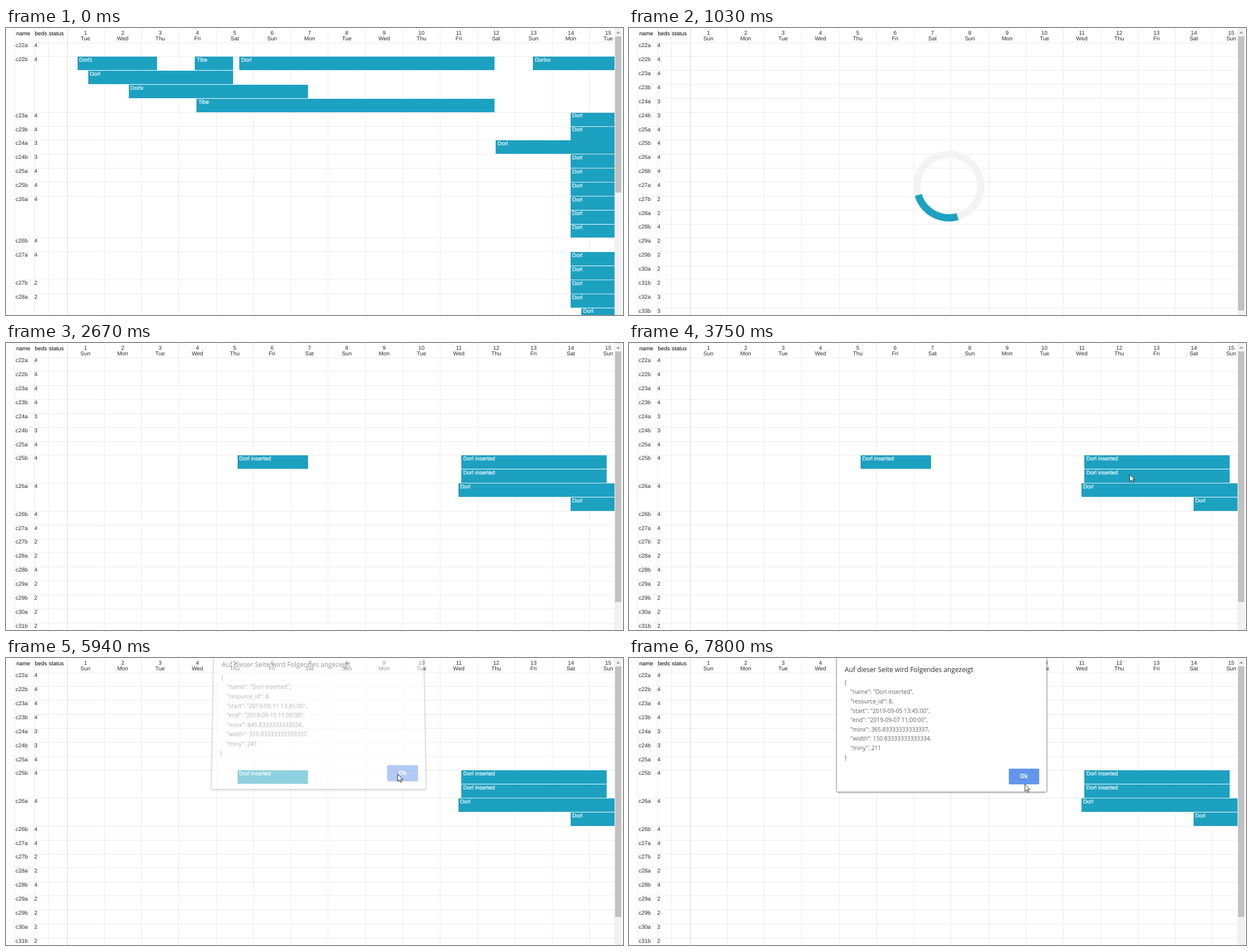
Animation, 1095 px wide and 511 px high, one loop 8 s. Source, as an HTML page:

```html
<!DOCTYPE html>
<html lang="de">
<head>
<meta charset="utf-8">
<title>Belegungsplan</title>
<style>
  html, body { margin: 0; width: 100%; height: 100%; overflow: hidden; background: #fff; }
  #stage { position: relative; width: 1095px; height: 511px; overflow: hidden; }
  #plan { position: absolute; left: 0; top: 0; }
  #plan text {
    font: 9.94px "Liberation Sans", Arial, sans-serif;
    text-rendering: geometricPrecision;
    fill: #2b2b2b;
  }
  #plan .head { fill: #000; }
  #plan .day { text-anchor: middle; }
  #plan .label { fill: #fff; stroke: #fff; stroke-width: .2px; }
  .bar { fill: #1da1c1; }
  .bar, .lines { shape-rendering: crispEdges; }
  .lines { stroke: #ebebeb; fill: none; }

  .scene, .ring, .dialog, .dialog pre, .dialog b { animation: 8s step-end infinite; }
  .scene, .ring { visibility: hidden; }
  .october { animation-name: october; }
  .empty, .ring { animation-name: empty; }
  .loaded { animation-name: loaded; }
  .inserted { animation-name: inserted; }
  @keyframes october { 0% { visibility: visible } 6.25%, 100% { visibility: hidden } }
  @keyframes empty { 0% { visibility: hidden } 6.25% { visibility: visible } 20.875%, 100% { visibility: hidden } }
  @keyframes loaded { 0% { visibility: hidden } 20.875% { visibility: visible } 33.375%, 100% { visibility: hidden } }
  @keyframes inserted { 0% { visibility: hidden } 33.375%, 100% { visibility: visible } }

  .ring { position: absolute; left: 505px; top: 218.5px; }
  .ring i {
    display: block; width: 99.5px; height: 99.5px;
    border: 13.25px solid #f3f3f3; border-top-color: #1da1c1; border-radius: 50%;
    animation: spin 8s linear infinite;
  }
  @keyframes spin {
    0%, 6% { transform: rotate(12.4deg); animation-timing-function: steps(15, end); }
    20.625%, 100% { transform: rotate(433.6deg); }
  }

  .dialog {
    position: absolute; left: 369px; top: -20px; width: 372px; height: 258px;
    box-sizing: border-box; background: #fff; border-radius: 2px; opacity: 0;
    box-shadow: 0 0 0 .8px rgba(0,0,0,.28), 0 1px 4px rgba(0,0,0,.45);
    font-family: "Open Sans", "Noto Sans", sans-serif;
    transform-origin: 186px 40px;
    animation-name: dialog;
  }
  .dialog p, .dialog pre, .dialog b { position: absolute; margin: 0; white-space: pre; }
  .dialog p { left: 13.8px; top: 32.2px; font-size: 11.85px; line-height: 16px; color: #2d2e30; }
  .dialog pre { left: 13.6px; top: 55.8px; font: 10.15px/16.6px "Open Sans", "Noto Sans", sans-serif; color: #606266; }
  .dialog b {
    left: 305px; top: 217px; width: 54px; height: 28px; border-radius: 2.5px;
    background: #669bf7; color: #fff; text-align: center;
    font-size: 9.8px; line-height: 27.5px; animation-name: hover;
  }
  .first { animation-name: first !important; }
  .second { animation-name: second !important; }
  @keyframes first { 0% { visibility: visible } 80%, 100% { visibility: hidden } }
  @keyframes second { 0% { visibility: hidden } 80%, 100% { visibility: visible } }
  @keyframes hover {
    0%, 75.125% { background: #669bf7 }
    66.375%, 97.5%, 100% { background: #6296ec }
  }
  @keyframes dialog {
    0%, 75.125% { opacity: 0; transform: none }
    53%, 87.625% { opacity: .5; transform: perspective(540px) translateY(-8px) rotateX(2.6deg) }
    53.875%, 88.75% { opacity: .85; transform: perspective(540px) translateY(-2.5px) rotateX(.8deg) }
    54.75%, 89.75%, 100% { opacity: 1; transform: none }
    73.25% { opacity: .85; transform: perspective(540px) translateY(-3px) rotateX(1deg) }
    74.25% { opacity: .5; transform: perspective(540px) translateY(-9px) rotateX(3deg) }
  }

  .cursor { position: absolute; left: 0; top: 0; overflow: visible; animation: cursor 8s linear infinite; }
  @keyframes cursor {
    0%, 40.24% { transform: translate(1110px, 530px) }
    40.25% { transform: translate(984px, 443px); animation-timing-function: ease-out }
    45%, 46.86% { transform: translate(889px, 234px) }
    46.875% { transform: translate(888px, 233.4px) }
    61.75% { transform: translate(888px, 233.4px); animation-timing-function: ease-in-out }
    66.375%, 68.36% { transform: translate(695.5px, 207px) }
    68.375% { transform: translate(694.7px, 206.3px) }
    76.25% { transform: translate(694.7px, 206.3px); animation-timing-function: ease-in }
    79.5% { transform: translate(604px, 203.8px); animation-timing-function: ease-out }
    82.875% { transform: translate(513.5px, 211px) }
    91.75% { transform: translate(513.5px, 211px); animation-timing-function: ease-in-out }
    96% { transform: translate(694px, 227px) }
    97.5%, 100% { transform: translate(702.2px, 224px) }
  }
</style>
</head>
<body>
<div id="stage">
  <svg id="plan" width="1095" height="511"></svg>
  <div class="ring"><i></i></div>
  <div class="dialog">
    <p>Auf dieser Seite wird Folgendes angezeigt</p>
    <pre class="first"></pre>
    <pre class="second"></pre>
    <b>Ok</b>
  </div>
  <svg class="cursor" width="12" height="18">
    <path d="M.4 .4V13.4L3.4 10.7 5.4 15.4 7.4 14.5 5.4 10H9.4Z" fill="#fff" stroke="#111" stroke-width=".9"/>
  </svg>
</div>
<script>
  const ROOMS = ('c22a4 c22b4 c23a4 c23b4 c24a3 c24b3 c25a4 c25b4 c26a4 c26b4 ' +
    'c27a4 c27b2 c28a2 c28b4 c29a2 c29b2 c30a2 c31b2 c32a3 c33b3').split(' ');
  const WEEK = ['Sun', 'Mon', 'Tue', 'Wed', 'Thu', 'Fri', 'Sat'];
  const LEFT = 108.1, DAY = 66.27, TOP = 26, ROW = 24.85, RIGHT = 1079.5;
  const GUEST = 'Dorl', OTHER = 'Tibe', NEW = GUEST + ' inserted';

  const text = (x, y, s, cls = '') => `<text class="${cls}" x="${x}" y="${y}">${s}</text>`;
  const laneY = lane => TOP + lane * ROW;
  const snap = v => Math.floor(v) + .5;

  function bar([lane, x, end, label]) {
    const y = laneY(lane) + .5;
    return `<rect class="bar" x="${x}" y="${y}" width="${end - x}" height="23.9"/>` +
      text(x + 3.3, y + 8.7, label, 'label');
  }

  // lanes: rooms that take more than one line
  function scene(name, firstDay, lanes, bars, thumbEnd) {
    let rows = '', path = '', lane = 0;
    for (const room of ROOMS) {
      const id = room.slice(0, 4), y = laneY(lane);
      path += `M15 ${snap(y)}H${RIGHT}`;
      rows += text(17, y + 8.4, id) + text(50.3, y + 8.4, room[4]);
      lane += lanes[id] || 1;
    }
    let days = '';
    for (let d = 0; d < 15; d++) {
      days += text(LEFT + DAY * (d + .5) - .3, 21.8, WEEK[(firstDay + d) % 7], 'day');
    }
    return `<g class="scene ${name}"><path class="lines" d="${path}"/>${rows}${days}` +
      bars.map(bar).join('') +
      `<rect x="1081" y="15" width="11" height="${thumbEnd - 15}" fill="#c1c1c1"/></g>`;
  }

  function frame() {
    let path = 'M15.5 0V511M50.5 0V511M75.5 0V511', dates = '';
    for (let d = 0; d < 15; d++) {
      if (d) path += `M${snap(LEFT + DAY * d)} 0V511`;
      dates += text(LEFT + DAY * (d + .5) - .3, 11.7, d + 1, 'day');
    }
    return `<path class="lines" d="${path}"/>` +
      '<path class="lines" d="M109 0V511" stroke-width="2"/>' +
      text(18.3, 13, 'name', 'head') + text(51.2, 13, 'beds', 'head') +
      text(76, 13, 'status', 'head') + dates +
      '<rect x="1079.5" width="13.5" height="511" fill="#f1f1f1"/>' +
      '<path d="M1083 10L1086.5 6 1090 10Z" fill="#a3a3a3"/>';
  }

  const stay = lane => [lane, 1001.5, RIGHT, GUEST];
  const october = [
    [1, 126.5, 267.6, GUEST + '1'], [1, 335.3, 403, OTHER], [1, 414.3, 867, GUEST],
    [1, 935.4, RIGHT, GUEST + 'xx'], [2, 145.6, 403, GUEST], [3, 217.5, 535.6, GUEST + 'x'],
    [4, 338.1, 867, OTHER], [7, 869, RIGHT, GUEST], [19, 1021, RIGHT, GUEST],
    ...[5, 6, 8, 9, 10, 11, 12, 13, 15, 16, 17, 18].map(stay)
  ];
  const late = [808.3, 1065.8, NEW];
  const september = lane => [[7, ...late], [lane, 802.6, RIGHT, GUEST], stay(lane + 1)];

  document.getElementById('plan').innerHTML = frame() +
    scene('october', 2, { c22b: 4, c26a: 3, c27a: 2, c28a: 2 }, october, 293) +
    scene('empty', 0, {}, [], 503) +
    scene('loaded', 0, { c26a: 2 }, september(8), 482) +
    scene('inserted', 0, { c25b: 2, c26a: 2 },
      [[7, 410.7, 535.6, NEW], [8, ...late], ...september(9)], 461);

  function report(cls, start, end, minx, width, miny) {
    const data = { name: NEW, resource_id: 8, start, end, minx, width, miny };
    document.querySelector(cls).textContent = JSON.stringify(data, null, 4);
  }
  report('.first', '2019-09-11 13:45:00', '2019-09-15 11:00:00', 845.8333333333334, 310.83333333333337, 241);
  report('.second', '2019-09-05 13:45:00', '2019-09-07 11:00:00', 365.83333333333337, 150.83333333333334, 211);
</script>
</body>
</html>
```
